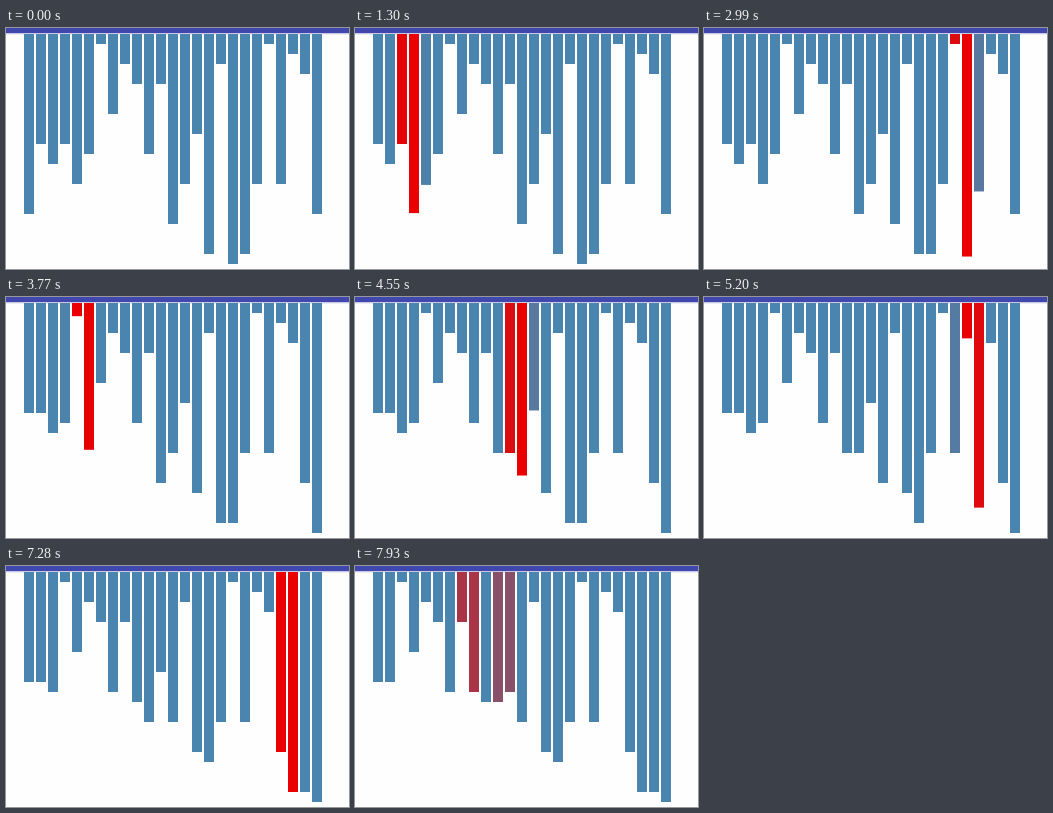
Recreate the animation shown at these times as an HTML page with a canvas. Size 343x241 px, loop 8000 ms.

```html
<!DOCTYPE html>
<html lang="en">
<head>
<meta charset="utf-8">
<title>Bubble sort</title>
<style>
  html, body { margin: 0; width: 100%; height: 100%; overflow: hidden; background: #fefefe; }
  canvas { display: block; }
</style>
</head>
<body>
<canvas id="stage" width="343" height="241"></canvas>
<script>
const LOOP = 8000, TICK = 130;               // the picture refreshes every TICK ms
const START = 918, INTERVAL = 120, DURATION = 112;
const BLUE = [73, 133, 175], RED = [234, 0, 0];
const values = [18, 11, 13, 11, 15, 12, 1, 8, 3, 5, 12, 5, 19, 15, 10,
                22, 3, 23, 22, 15, 1, 15, 2, 4, 18];
const ctx = document.getElementById('stage').getContext('2d');

const swapped = (list, j) => {
  const next = [...list];
  [next[j], next[j + 1]] = [list[j + 1], list[j]];
  return next;
};
const mix = (a, b, p) => a + (b - a) * p;
const easeCubic = t => t < 0.5 ? 4 * t ** 3 : 1 - 4 * (1 - t) ** 3;

// Bubble sort: one state per swap, with the left index of the swapped pair.
const states = [{ list: values, pair: -9 }];
for (let end = values.length - 1; end > 0; end--) {
  for (let j = 0; j < end; j++) {
    const { list } = states[states.length - 1];
    if (list[j] > list[j + 1]) states.push({ list: swapped(list, j), pair: j });
  }
}

const isLit = (state, i) => i === state.pair || i === state.pair + 1 ? 1 : 0;

function draw(time) {
  const k = Math.floor((time - START) / INTERVAL);
  const from = states[Math.max(k, 0)];
  const to = states[Math.max(k + 1, 0)];
  const p = easeCubic(Math.min(1, (time - START - k * INTERVAL) / DURATION));

  ctx.fillStyle = '#fefefe';
  ctx.fillRect(0, 0, 343, 241);
  ctx.fillStyle = '#c9c9e6';
  ctx.fillRect(0, 5, 343, 1);
  ctx.fillStyle = '#ececf6';
  ctx.fillRect(0, 6, 343, 1);
  ctx.fillStyle = '#4048ae';
  ctx.fillRect(0, 0, 343, 5);

  values.forEach((_, i) => {
    const heat = mix(isLit(from, i), isLit(to, i), p);
    ctx.fillStyle = `rgb(${BLUE.map((c, n) => Math.round(mix(c, RED[n], heat)))})`;
    ctx.fillRect(18 + 12 * i, 6, 10, 10 * mix(from.list[i], to.list[i], p));
  });
}

function frame() {
  const time = performance.now() % LOOP;
  draw(Math.floor(time / TICK) * TICK);
  requestAnimationFrame(frame);
}
frame();
</script>
</body>
</html>
```
